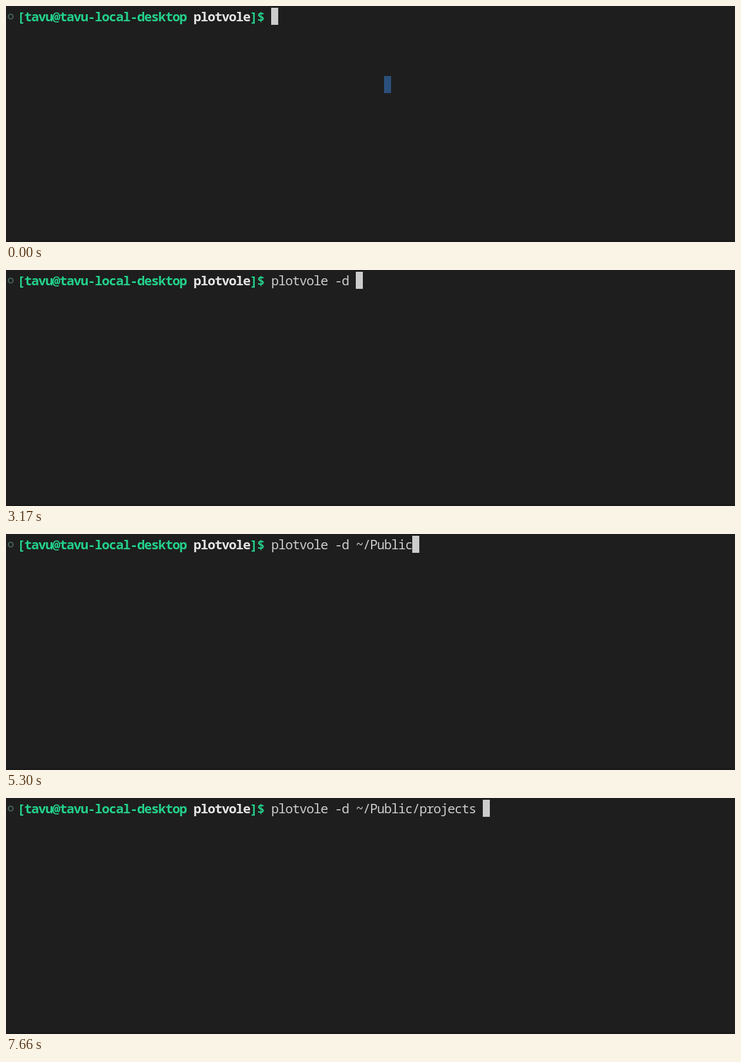
Write an HTML page that moves like this. It is 1240 px wide and 401 px high and loops after 8000 ms.

```html
<!DOCTYPE html>
<html lang="en">
<head>
<meta charset="utf-8">
<title>Terminal typing</title>
<style>
  html, body { margin: 0; width: 100%; height: 100%; overflow: hidden; background: #1e1e1e; }
  body { position: relative; }
  body > * { position: absolute; }
  #line {
    left: 19px; top: 3px; margin: 0; height: 29px;
    font: 22px/29px "Noto Sans Mono", monospace;
    letter-spacing: calc(12px - 1ch);
    font-variant-ligatures: none;
    white-space: pre; color: #ccc;
  }
  b { color: #23d18b; }
  b i { font-style: normal; color: #e5e5e5; }
  .cell { width: 12px; height: 29px; }
  #cursor { display: inline-block; vertical-align: top; background: #ccc; }
  #mark { left: 643px; top: 119px; background: #2b507b; }
  #dot {
    left: 3px; top: 13px; width: 10px; height: 10px; box-sizing: border-box;
    border: 2px solid #466458; border-radius: 50%;
  }
  #edge { left: 0; right: 0; top: 398px; height: 3px; background: #1a1a1a; }
</style>
</head>
<body>
<div id="dot"></div>
<div id="line"><b>[tavu@tavu-local-desktop <i>plotvole</i>]$</b> <span id="typed"></span><span id="cursor" class="cell"></span></div>
<div id="mark" class="cell"></div>
<div id="edge"></div>
<script>
  const LOOP = 8000;
  const command = "plotvole -d ~/Public/projects ";
  // Time of each key press in ms
  const keys = [
    500, 600, 740, 900, 1300, 1530, 1600, 1830, 2290,
    2590, 2740, 3170, 3670, 3970,
    4500, 4670, 4830, 4980, 5130, 5300, 5760,
    6130, 6270, 6370, 6480, 6680, 6820, 7110, 7260, 7660
  ];
  const typed = document.getElementById("typed");
  const mark = document.getElementById("mark");
  let shown = -1;

  function draw() {
    const t = performance.now() % LOOP;
    const count = keys.filter(key => key <= t).length;
    if (count !== shown) {
      shown = count;
      typed.textContent = command.slice(0, count);
      mark.hidden = count > 0;
    }
    requestAnimationFrame(draw);
  }
  draw();
</script>
</body>
</html>
```
